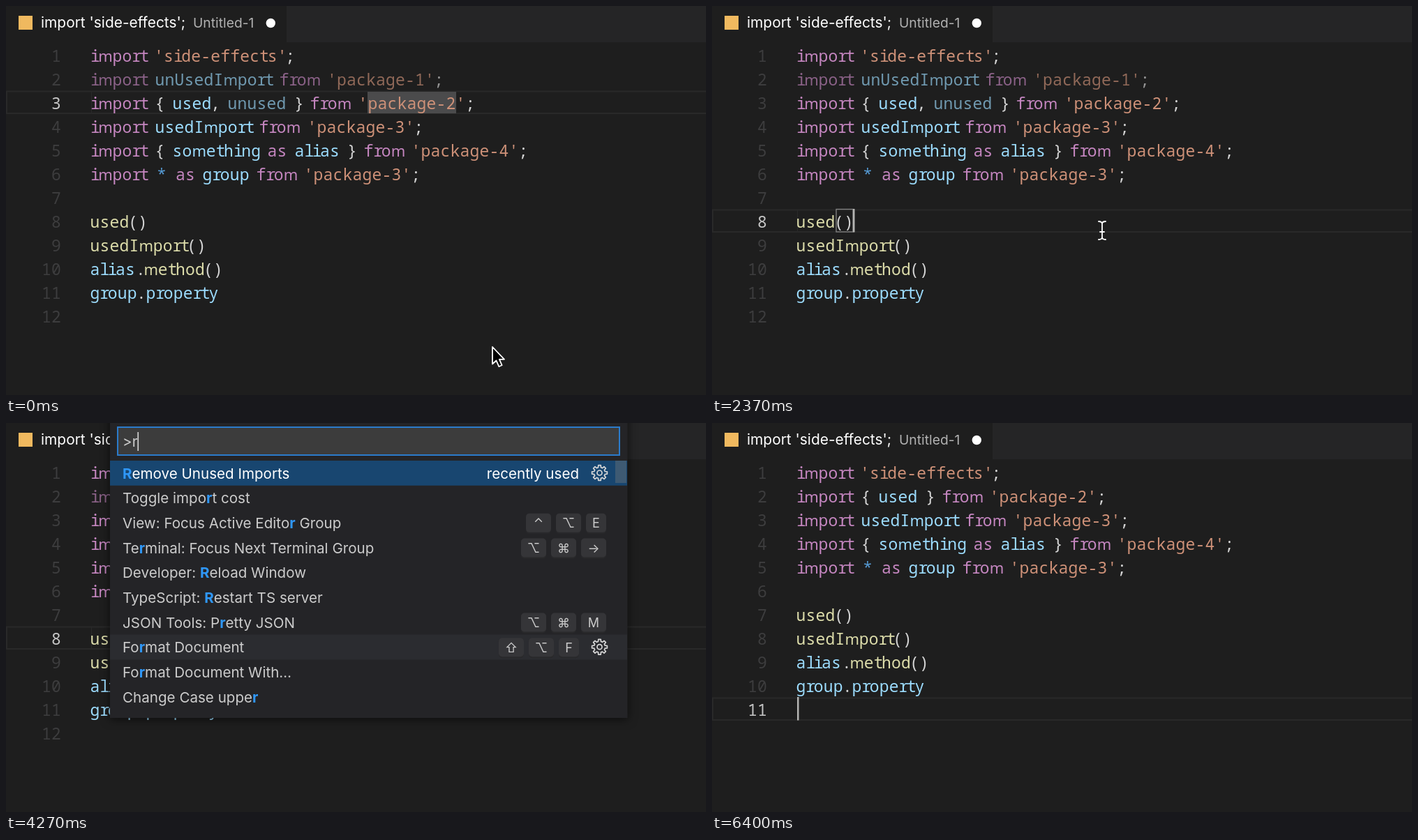
Recreate the animation shown at these times as an HTML page. Size 1003 px wide and 558 px high, loop 6.43 s.

```html
<!DOCTYPE html>
<html lang="en">
<head>
<meta charset="utf-8">
<title>Remove unused imports</title>
<style>
  html, body { margin: 0; width: 100%; height: 100%; overflow: hidden; background: #1e1e1e; }
  svg { display: block; }
  text { white-space: pre; font: 20.6px Inter, "DejaVu Sans", sans-serif; fill: #ccc; }
  .code text { font: 500 23px "Noto Sans Mono", "DejaVu Sans Mono", monospace; letter-spacing: .2px; }
  .code .wide { font: 500 22px "Noto Sans", sans-serif; letter-spacing: -.4px; }
  .code .narrow { letter-spacing: -2.5px; }
  .code .k { fill: #c586c0; }
  .code .v { fill: #9cdcfe; }
  .code .s { fill: #ce9178; }
  .code .f { fill: #dcdcaa; }
  .code .o { fill: #569cd6; }
  .code .p { fill: #d4d4d4; }
  .code .num { fill: #3d3d3e; text-anchor: end; }
  .code .on { fill: #c6c6c6; }
  .dim { opacity: .65; }
  .panel { filter: drop-shadow(0 2px 7px rgba(0, 0, 0, .6)); }
  .panel .white { fill: #fff; }
  .panel .link { fill: #3f94f0; }
  .panel .end { text-anchor: end; }
  .panel .key { font-size: 18px; text-anchor: middle; }
  .hit { font-weight: 700; fill: #2f97f7; }
  .gear { fill: none; stroke: #d8d8d8; stroke-width: 1.7; stroke-linejoin: round; }
</style>
</head>
<body>
<svg width="1003" height="558" viewBox="0 0 1003 558">
  <rect width="1003" height="558" fill="#1e1e1e"/>
  <rect x="402" width="601" height="52" fill="#252526"/>
  <rect x="18" y="14" width="20" height="20" fill="#f0b95f"/>
  <text x="50" y="31" style="font-size:20.9px;fill:#fff">import 'side-effects';</text>
  <text x="268" y="31" style="font-size:19.3px;fill:#b2b2b2">Untitled-1</text>
  <circle cx="379.300" cy="24.500" r="6.700" fill="#fff"/>
  <g id="editor" class="code"></g>
  <g id="palette" class="panel"></g>
  <g id="mouse" stroke-linejoin="round">
    <path id="arrow" d="M0 0V24.500L5.500 19.500L9.300 28.200L13.600 26.300L9.900 17.800H17Z" fill="#000" stroke="#fff" stroke-width="1.8"/>
    <path id="beam" d="M-5 -13Q0 -13 0 -9.500Q0 -13 5 -13M0 -9.500V9.500M-5 13Q0 13 0 9.500Q0 13 5 13M-3 2H3" fill="none" stroke="#fff" stroke-width="1.8" stroke-linecap="round"/>
    <path id="hand" d="M-2.500 2Q-2 -.5 .5 .5L3.500 9Q5 7.500 6.500 9.500Q8.500 8.200 10 10.500Q12.500 9.800 13.500 13L15.500 18L14 25H3L-3 18.500Q-6 15.500 -4.500 14Q-2.500 13 1 16Z" fill="#fff" stroke="#111" stroke-width="1.6"/>
  </g>
</svg>
<script>
const LOOP = 6430;
const CLICK_LINE_10 = 900, CLICK_LINE_8 = 1750, OPEN = 2790, CLOSE = 5020, CLEANED = 5200;
const KEY_TIMES = [4150, 4380, 4450, 4550, 4640, 4770];
const $ = id => document.getElementById(id);

// Token: class letter, optional "-" for unused code, x, text
const IMPORT = 'k121 import|';
const SIDE = IMPORT + "s212 'side-effects'|p400 ;";
const KEPT = [
  IMPORT + "v213.5 usedImport|k362.5 from|s431.5 'package-3'|p584 ;",
  IMPORT + "p213.5 {|v238.5 something|k374.5 as|v413.5 alias|p489 }|k512.5 from|s580.5 'package-4'|p734 ;",
  IMPORT + "o216 *|k243 as|v281.5 group|k358.5 from|s426.5 'package-3'|p580 ;",
  '',
  'f120.5 used|p175 ()',
  'f120.5 usedImport|p259 ()',
  'v120.5 alias|p186 .|f197.5 method|p283 ()',
  'v120.5 group|p187 .|v200.5 property',
  ''
];
const BEFORE = [
  SIDE,
  "k-121 import|v-213.5 unUsedImport|k-391.5 from|s-460 'package-1'|p-613 ;",
  IMPORT + "p213.5 {|v238.5 used|p293 ,|v-317.5 unused|p413 }|k435.5 from|s504.5 'package-2'|p658 ;",
  ...KEPT
];
const AFTER = [
  SIDE,
  IMPORT + "p213.5 {|v238.5 used|p306 }|k329.5 from|s397.5 'package-2'|p551 ;",
  ...KEPT
];

// "*" marks the start of the matched letters; after "|" come the shortcut keys
const RECENT = [
  'Remove Unused Imports', 'Change Language Mode|⌘K M', 'Toggle import cost',
  'View: Focus Active Editor Group|⌃⌥E', 'Terminal: Focus Next Terminal Group|⌥⌘→',
  'Developer: Reload Window', 'TypeScript: Restart TS server', 'Toggle Block Comment|⌥⌘/',
  'Emmet: Toggle Comment', 'JSON Tools: Pretty JSON|⌥⌘M'
];
const BY_LETTER = [
  '*Remove Unused Imports', 'Toggle impo*rt cost', 'View: Focus Active Edito*r Group|⌃⌥E',
  'Te*rminal: Focus Next Terminal Group|⌥⌘→', 'Developer: *Reload Window',
  'TypeScript: *Restart TS server', 'JSON Tools: P*retty JSON|⌥⌘M', 'Fo*rmat Document|⇧⌥F',
  'Fo*rmat Document With…', 'Change Case uppe*r'
];
const BY_WORD = [
  '*Remove Unused Imports',
  ...['Containers', 'Contexts', 'Images', 'Networks', 'Volumes'].map(s => `Docker ${s}: *Remove…`),
  'Emmet: *Remove Tag', 'Git Graph: *Remove Git Repository…',
  'Rainbow CSV: Shrink CSV table: *Remove leading and trailing whites…', '*Remove All Breakpoints'
];
const HOVERED = 7;
const KEY_WIDTHS = { K: 31, E: 29, F: 29, '/': 24 };

const text = (x, y, cls, s) => `<text x="${x}" y="${y}" class="${cls}">${s}</text>`;
const rect = (x, y, w, h, fill, more = '') =>
  `<rect x="${x}" y="${y}" width="${w}" height="${h}" fill="${fill}" ${more}/>`;

// The code face is not quite monospaced: a broad m, tighter i, l, r and t
const setCode = s => s.replace(/m|[ilrt]+/g, part =>
  `<tspan class="${part === 'm' ? 'wide' : 'narrow'}">${part}</tspan>`);

function codeLine(line, y) {
  return line.split('|').filter(Boolean).map(token => {
    const [, cls, unused, x, s] = token.match(/^(\w)(-?)([\d.]+) (.*)$/);
    return text(x, y, cls + (unused && ' dim'), setCode(s));
  }).join('');
}

function editor(lines, active) {
  const top = 20 + 34 * active;
  const bracketX = { 8: 178, 10: 285 }[active];
  let out = rect(1, top + .5, 1010, 31.5, 'none', 'stroke="#292929" stroke-width="2"')
    + rect(122, top, 1, 32, '#292929');
  if (active === 3) out += rect(518, top + 1, 127, 31, '#4b4b4c');
  lines.forEach((line, i) => {
    const y = 80 + 34 * i;
    out += text(79, y, i + 1 === active ? 'num on' : 'num', i + 1) + codeLine(line, y);
  });
  if (bracketX) {
    out += rect(bracketX, top - .5, 24, 32.5, 'none', 'stroke="#858585" stroke-width="1.3"')
      + rect(bracketX + 24, top - 1, 2.5, 33.5, '#b4b4b2');
  }
  if (active === 11) out += rect(122, top - 1, 2.5, 33.5, '#b4b4b2');
  return out;
}

function gear(cy) {
  const points = Array.from({ length: 32 }, (_, i) => {
    const radius = i % 4 < 2 ? 11 : 8;
    const angle = (Math.floor(i / 4) + [-.2, .2, .32, .68][i % 4]) * Math.PI / 4;
    return [850.5 + radius * Math.cos(angle), cy + radius * Math.sin(angle)].map(n => n.toFixed(1));
  });
  return `<g class="gear"><polygon points="${points.join(' ')}"/><circle cx="850.5" cy="${cy}" r="3.5"/></g>`;
}

function shortcut(keys, right, cy) {
  let out = '';
  for (const key of [...keys].reverse()) {
    if (key === ' ') { right -= 8; continue; }
    const w = KEY_WIDTHS[key] || 36;
    out += rect(right - w, cy - 13.5, w, 29, '#29292b', 'rx="5"')
      + rect(right - w, cy - 13.5, w, 27, '#353538', 'rx="5"')
      + text(right - w / 2, cy + 7, 'key', key);
    right -= w + 7;
  }
  return out;
}

function palette(query, caretOn) {
  const n = query.length;
  const rows = n === 0 ? RECENT : n === 1 ? BY_LETTER : BY_WORD;
  let out = rect(149, -20, 741.5, 443, '#242427')
    + rect(160, 6, 719, 40, '#3c3c3c', 'stroke="#2b7bcb" stroke-width="2"')
    + `<text id="query" x="167" y="34">&gt;${query}</text>`
    + rect(149, 54, 741, n > 1 ? 37 : 35.7, '#184670')
    + rect(149, 303.5, 741, 36, '#2b2c30');
  rows.forEach((row, i) => {
    const cy = 72 + 35.67 * i + (n > 1 && i === 1 ? 2 : 0);
    const [label, keys = ''] = row.split('|');
    const [head, tail] = label.split('*');
    const marked = tail === undefined ? head
      : `${head}<tspan class="hit">${tail.slice(0, n)}</tspan>${tail.slice(n)}`;
    const withGear = i === 0 || i === HOVERED;
    out += text(167, cy + 7.5, i ? '' : 'white', marked) + shortcut(keys, withGear ? 821 : 860, cy);
    if (withGear) out += gear(cy - .5);
  });
  out += text(821, 79.5, 'white end', 'recently used');
  if (n > 1) out += text(860, 117, 'link end', 'other commands');
  if (n) out += rect(873, 54, 16, n > 1 ? 254 : 32, '#797979', 'opacity=".4"');
  if (caretOn) out += '<rect id="caret" y="13" width="1.7" height="27" fill="#d0d0d0"/>';
  return out;
}

const drawn = {};
function update(id, key, build) {
  if (drawn[id] === key) return false;
  drawn[id] = key;
  $(id).innerHTML = build();
  return true;
}

const ease = (t, from, to) => {
  const u = Math.min(1, Math.max(0, (t - from) / (to - from)));
  return u * u * (3 - 2 * u);
};

function moveMouse(t) {
  const a = ease(t, 60, 660), b = ease(t, 1080, 1480);
  const x = 697 - 138 * a, y = 489 - 111 * a - 56 * b;
  const shape = t >= OPEN ? 'hand' : y > 465 ? 'arrow' : 'beam';
  $('mouse').setAttribute('transform', `translate(${x} ${y})`);
  $('mouse').style.display = t < KEY_TIMES[0] ? '' : 'none';
  for (const id of ['arrow', 'beam', 'hand']) $(id).style.display = id === shape ? '' : 'none';
}

function render(now) {
  const t = now % LOOP;
  const active = t < CLICK_LINE_10 ? 3 : t < CLICK_LINE_8 ? 10 : t < CLEANED ? 8 : 11;
  update('editor', active, () => editor(active === 11 ? AFTER : BEFORE, active));

  const open = t >= OPEN && t < CLOSE;
  const query = 'remove'.slice(0, KEY_TIMES.filter(k => t >= k).length);
  const caretOn = query !== '' || (t - OPEN) % 1000 < 500;
  const changed = update('palette', open ? query + caretOn : '', () => open ? palette(query, caretOn) : '');
  if (changed && open && caretOn) {
    $('caret').setAttribute('x', 167 + $('query').getComputedTextLength());
  }
  moveMouse(t);
  requestAnimationFrame(render);
}
requestAnimationFrame(render);
</script>
</body>
</html>
```
